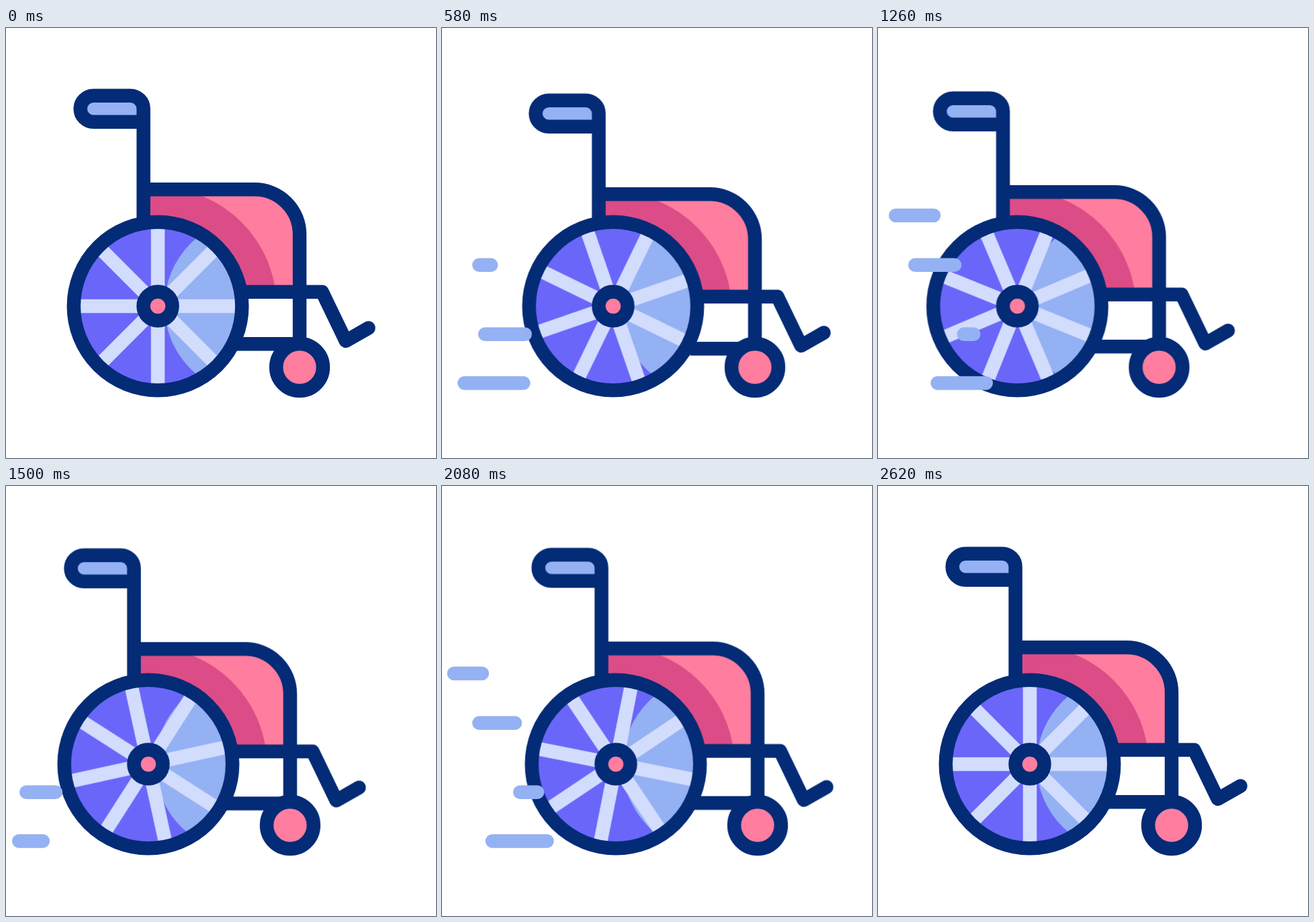
An HTML page without scripts for the animation above (3 s loop, 640x640 px).

```html
<!DOCTYPE html>
<html lang="en">
<head>
<meta charset="utf-8">
<title>Rolling wheelchair</title>
<style>
@property --l { syntax: "<length>"; inherits: false; initial-value: 0px; }
@property --r { syntax: "<length>"; inherits: false; initial-value: 0px; }

html, body { margin: 0; width: 100%; height: 100%; overflow: hidden; background: #fff; }
svg { display: block; width: 100%; height: 100%; }

.line { fill: none; stroke: #042b76; stroke-width: 20.5; stroke-linecap: round; stroke-linejoin: round; }
.butt { stroke-linecap: butt; }
.spokes { stroke: #d2dcfd; stroke-width: 20.5; }
.pink { fill: #ff7d9f; }
.rose { fill: #dc4c86; }
.blue { fill: #94b1f3; }
.violet { fill: #6a66f9; }

.chair, .body, .spokes { animation: 3s cubic-bezier(.3333, 0, .6667, 1) infinite; }
.chair { animation-name: drive; }
.body { animation-name: bob; }
.spokes { animation-name: spin; transform-origin: 226px 414px; }

@keyframes drive {
  0%, 6.667% { transform: translateX(0); }
  26% { transform: translateX(39.5px); }
  45.333% { transform: translateX(-23.5px); }
  64.667% { transform: translateX(39.5px); }
  82.5%, 100% { transform: translateX(0); }
}
@keyframes bob {
  0%, 6.667%, 26.667%, 46.667%, 66.667%, 86.667%, 100% { transform: translateY(0); }
  16.667%, 36.667%, 56.667%, 76.667% { transform: translateY(8.6px); }
}
@keyframes spin {
  0%, 6.667% { transform: rotate(0deg); }
  84%, 100% { transform: rotate(360deg); }
}

/* Each streak runs from --a to --b; its left end leads, its right end follows. */
.wind rect {
  --l: var(--a);
  --r: var(--a);
  x: var(--l);
  width: calc(var(--r) - var(--l) + 20.5px);
  height: min(20.5px, (var(--r) - var(--l)) * 99);
  rx: 10.25px;
  animation: 3s cubic-bezier(.3333, 0, .6667, 1) var(--d) infinite;
}
.wind:nth-of-type(1) { --d: .2s; }
.wind:nth-of-type(2) { --d: .995s; }
.wind:nth-of-type(3) { --d: 1.79s; }

.wind .s1 { --a: 153px; --b: 3px; y: 268.75px; animation-name: lead1, trail1; }
.wind .s2 { --a: 105px; --b: 45px; y: 342.5px; animation-name: lead2, trail2; }
.wind .s3 { --a: 132px; --b: 20px; y: 445.5px; animation-name: lead3, trail3; }
.wind .s4 { --a: 152px; --b: 9px; y: 518.25px; animation-name: lead4, trail4; }

@keyframes lead1 { 0% { --l: var(--a); } 10.83%, 100% { --l: var(--b); } }
@keyframes trail1 { 0%, 4.77% { --r: var(--a); } 12.6%, 100% { --r: var(--b); } }
@keyframes lead2 { 0%, 1.5% { --l: var(--a); } 8.33%, 100% { --l: var(--b); } }
@keyframes trail2 { 0%, 8.3% { --r: var(--a); } 15.17%, 100% { --r: var(--b); } }
@keyframes lead3 { 0%, 6.77% { --l: var(--a); } 16.1%, 100% { --l: var(--b); } }
@keyframes trail3 { 0%, 9.27% { --r: var(--a); } 22.5%, 100% { --r: var(--b); } }
@keyframes lead4 { 0%, 2.23% { --l: var(--a); } 15.23%, 100% { --l: var(--b); } }
@keyframes trail4 { 0%, 8.1% { --r: var(--a); } 21.1%, 100% { --r: var(--b); } }
</style>
</head>
<body>
<svg viewBox="0 0 640 640">
  <defs>
    <path id="side" d="M204.6 240.3H370A67 67 0 0 1 437 307.3V392.7H204.6Z"/>
    <clipPath id="sideClip"><use href="#side"/></clipPath>
    <clipPath id="rimClip"><circle cx="226" cy="414" r="120"/></clipPath>
  </defs>

  <g class="chair">
    <g class="body">
      <use href="#side" class="pink"/>
      <circle class="rose" cx="226" cy="414" r="176.5" clip-path="url(#sideClip)"/>
      <path class="blue" d="M204.6 139.8H130.2A19.5 19.5 0 0 1 130.2 100.7H185A19.5 19.5 0 0 1 204.6 120.2Z"/>
      <path class="line" d="M204.6 300V120.2A19.5 19.5 0 0 0 185 100.7H130.2A19.5 19.5 0 0 0 130.2 139.8H204.6"/>
      <path class="line butt" d="M204.6 240.3H370A67 67 0 0 1 437 307.3V490"/>
      <path class="line" d="M330 392.7H470.5L505.7 465.8L539.6 446.5"/>
      <path class="line butt" d="M340.5 470.2H437"/>
    </g>

    <circle class="line" cx="437" cy="505" r="34.9" style="fill:#ff7d9f"/>

    <g clip-path="url(#rimClip)">
      <circle class="violet" cx="226" cy="414" r="120"/>
      <circle class="blue" cx="368" cy="414" r="132"/>
    </g>
    <g class="spokes">
      <path d="M226 294V534M106 414H346M141.1 329.1L310.9 498.9M310.9 329.1L141.1 498.9"/>
    </g>
    <circle class="line" cx="226" cy="414" r="125.2"/>
    <circle class="line" cx="226" cy="414" r="21.5" style="fill:#ff7d9f"/>
  </g>

  <g class="blue">
    <g class="wind"><rect class="s1"/><rect class="s2"/><rect class="s3"/><rect class="s4"/></g>
    <g class="wind"><rect class="s1"/><rect class="s2"/><rect class="s3"/><rect class="s4"/></g>
    <g class="wind"><rect class="s1"/><rect class="s2"/><rect class="s3"/><rect class="s4"/></g>
  </g>
</svg>
</body>
</html>
```
